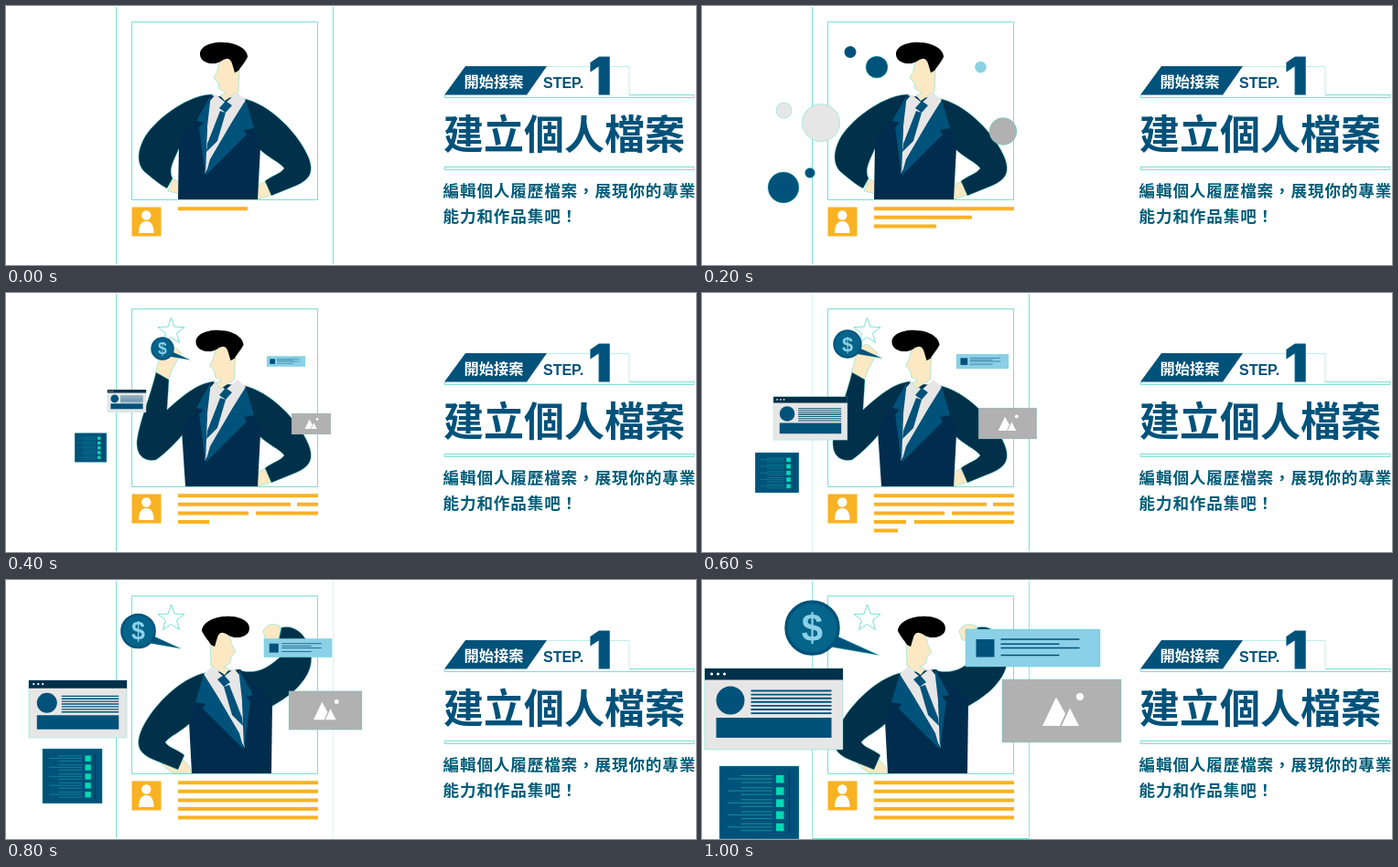
An HTML page for the animation above (1500 ms loop, 754 by 284 pixels).

```html
<!DOCTYPE html>
<html lang="zh-Hant">
<head>
<meta charset="utf-8">
<title>建立個人檔案</title>
<style>
  html, body { margin: 0; width: 100%; height: 100%; overflow: hidden; background: #fff; }
  svg { display: block; width: 100%; height: 100%; }
  text { font-family: "Noto Sans CJK TC", "Noto Sans CJK", sans-serif; font-weight: 700; fill: #00527a; }
  .latin { font-family: "Liberation Sans", Arial, sans-serif; }
  .body { font-size: 17.6px; letter-spacing: .85px; fill: #005c78; }
  .thin { fill: none; stroke: #58d8c6; stroke-width: .8; }
  .edge { stroke: #35dcc0; stroke-width: .4; }
  .navy { fill: #00304a; }
  .blue { fill: #00527a; }
  .skin { fill: #fde8c4; }
  .sky { fill: #8cd0e7; }
  .light { fill: #e6e6e6; }
  .gray { fill: #b1b1b1; }
  .white { fill: #fff; }
  .yellow { fill: #f9b223; }
</style>
</head>
<body>
<svg viewBox="0 0 754 284" preserveAspectRatio="none">
  <g class="thin">
    <path id="leftLine" d="M120.5 1V283"/>
    <path id="rightLine" d="M357.5 1V283"/>
    <path id="bottomLine" d="M120.5 283.5H357.5"/>
    <path d="M137.5 17.5H340.5V212.5H137.5Z"/>
    <path d="M681 97.5H752V100.5H479.5V97.5M479.5 176.5H752V179.5H479.5Z"/>
    <path d="M590 66.5H681V97" opacity=".5"/>
  </g>

  <path class="blue" d="M502 66H591L569 97.5H479Z"/>
  <text x="500.5" y="89" font-size="16.3" style="fill:#fff">開始接案</text>
  <text class="latin" x="587" y="90" font-size="16">STEP.</text>
  <text x="636.5" y="96.5" font-size="56" stroke="#00527a" style="font-family:Inter,sans-serif;font-weight:900">1</text>
  <text x="478" y="156.5" font-size="44">建立個人檔案</text>
  <text class="body" x="477.500" y="208.5">編輯個人履歷檔案，展現你的專業</text>
  <text class="body" x="477.500" y="237">能力和作品集吧！</text>

  <path class="yellow" d="M137.5 220.5H169.5V252.5H137.5Z"/>
  <circle class="white" cx="153.3" cy="229.5" r="5.2"/>
  <path class="white" d="M145 249C145 240 148 236 153.3 236S161.5 240 161.5 249Z"/>
  <path id="rows" stroke="#f9b223" stroke-width="4"/>

  <g id="man">
    <path id="leftHand" class="skin edge"/>
    <path id="leftArm" class="navy edge"/>
    <path id="rightHand" class="skin edge"/>
    <path class="navy edge" d="M257 101C289 106 322 143 331 167C337 183 331 191 317 197L290 208 283 192C290 186 300 184 304 178C300 172 286 166 277 157Z"/>
    <path id="torso" fill="#002d4d"/>
    <path class="light" d="M229 97L221 106 217 184 250 132 262 103 253 95 240 106Z"/>
    <g id="head">
      <path class="skin edge" d="M234 58L248 56 250 73 255 69 254 94 239 104 234 98 240 95 233 91 232 84 227 79 231 71Z"/>
      <path d="M212 53C212 44 225 39 238 40C251 40 264 47 264 56C261 62 257 66 254 71L250 73 247 63C245 56 240 57 236 60C228 66 212 63 212 53Z"/>
    </g>
    <path class="blue" d="M240 104L247 109 240 117 233 112ZM234 115L240 117 231 148 219 160 220 151Z"/>
    <path class="blue" d="M224 97L208 126 216 128 211 133 218 186 220 132ZM262 103L271 134 260 136 263 141 218 186 223 168 247 127Z"/>
  </g>

  <path id="star" class="thin" d="M180.5 27L184 37 195 37.5 186.5 44 189.5 54.5 180.5 48.5 171.5 54.5 174.5 44 166 37.5 177 37Z"/>

  <!-- Cards are drawn around their own centre at full size. -->
  <g id="windowCard">
    <path class="light edge" d="M-75.5-44.5H75.5V44.5H-75.5Z"/>
    <path class="navy" d="M-75.5-44.5H75.5V-32H-75.5Z"/>
    <path d="M-68-38.5h.1m6.9 0h.1m6.9 0h.1" stroke="#fff" stroke-width="3" stroke-linecap="round"/>
    <circle class="blue" cx="-47.5" cy="-9.5" r="15.5"/>
    <path id="windowText" stroke="#00527a" stroke-width="1.9"/>
    <path class="blue" d="M-63 9.5H63V31.5H-63Z"/>
  </g>
  <g id="listCard">
    <path class="blue edge" d="M-43.5-40H43.5V40H-43.5Z"/>
    <g id="listItems"></g>
    <path d="M33-33V33" stroke="#00304a" stroke-width="1"/>
  </g>
  <g id="imageCard">
    <path class="gray edge" d="M-65-34.5H65V34.5H-65Z"/>
    <path class="white" d="M-21 16.5L-6-15 4 3-2 16.5ZM0 16.5L9-3 19 16.5Z"/>
    <circle class="white" cx="20" cy="-15.5" r="4"/>
  </g>
  <g id="textCard">
    <path class="sky edge" d="M-73.5-20.5H73.5V20.5H-73.5Z"/>
    <path class="blue" d="M-62-9.5H-42V10H-62Z"/>
    <path d="M-35-9.5H51M-35-4.2H29M-35 0H51M-35 8H29" stroke="#00527a" stroke-width="1.5"/>
  </g>
  <g id="bubble">
    <path class="blue edge" d="M27 9L73 30 21 21Z"/>
    <circle r="28.5" fill="#04648a" stroke="#00527a" stroke-width="3.5"/>
    <text class="latin" y="14.5" font-size="42" text-anchor="middle" style="fill:#8cd0e7">$</text>
  </g>

  <g id="dots">
    <circle class="blue" cx="162" cy="50.5" r="6.5"/>
    <circle class="blue edge" cx="191" cy="67" r="12"/>
    <circle class="sky edge" cx="304.5" cy="67" r="6"/>
    <circle class="light edge" cx="89.5" cy="114.5" r="8.5"/>
    <circle class="light edge" cx="130" cy="128" r="20.5"/>
    <circle class="gray edge" cx="329" cy="137.5" r="15"/>
    <circle class="blue edge" cx="89" cy="199" r="17"/>
    <circle class="blue edge" cx="118" cy="183" r="5.5"/>
  </g>
</svg>
<script>
const LOOP = 1500;
const el = id => document.getElementById(id);
const show = (id, on) => el(id).setAttribute('visibility', on ? 'visible' : 'hidden');
const setPath = (id, d) => el(id).setAttribute('d', d);

const hipHand = 'M275 197L284 192 291 207 275 212Z';
const poses = {
  hips: {
    leftHand: 'M177 203L182 189 189 193 190 206Z',
    leftArm: 'M226 97C203 96 167 120 152 143C141 162 144 177 154 184C162 191 170 197 176 200L182 189C177 178 184 169 190 154Z',
    rightHand: hipHand,
    torso: 'M222 98L260 102 278 155 275 212H188L189 150Z',
    head: 0
  },
  raised: {
    leftHand: 'M163 89L168 70C171 60 176 55 182 57L192 66 187 74 181 85 177 97Z',
    leftArm: 'M228 97C211 98 196 110 176 128L178 95 164 87C157 115 146 140 143 162C142 181 154 185 164 183C175 175 185 165 195 153Z',
    rightHand: hipHand,
    torso: 'M222 98L260 102 278 155 275 212H196L192 150Z',
    head: -4.5
  },
  high: {
    leftHand: 'M178 51C186 46 194 49 197 56L194 66H180Z',
    leftArm: 'M226 98C205 105 193 97 178 84L180 66 177 52C163 49 153 58 148 70C141 85 144 100 156 114C164 124 176 132 190 140Z',
    rightHand: 'M275 212C276 205 282 198 289 194L302 190 308 202 296 212Z',
    torso: 'M222 98L260 102 278 155 275 212H188L187 135Z',
    head: 0
  }
};

// Card centre x, centre y, scale.
const cardSizes = {
  small:  { windowCard: [132, 118.5, .28], listCard: [92.5, 169.5, .4], imageCard: [333.5, 143.5, .33], textCard: [306, 75, .285], bubble: [171, 61, .42] },
  medium: { windowCard: [118.5, 137.5, .535], listCard: [82, 197, .55], imageCard: [334, 143, .49], textCard: [306.5, 75, .388], bubble: [159, 56, .52] },
  large:  { windowCard: [78.5, 141.5, .71], listCard: [72.5, 215, .75], imageCard: [349, 143, .615], textCard: [319, 74.5, .505], bubble: [144.5, 56, .64] },
  full:   { windowCard: [78.5, 141.5, 1], listCard: [62.5, 244, 1], imageCard: [393, 143.5, 1], textCard: [361.5, 74.5, 1], bubble: [120.5, 52.5, 1] }
};
const blend = (a, b) => Object.fromEntries(Object.keys(a).map(
  id => [id, a[id].map((v, i) => (v + b[id][i]) / 2)]));
const shrink = (cards, k) => Object.fromEntries(Object.entries(cards).map(
  ([id, [x, y, s]]) => [id, [x, y, s * k]]));

// Each row of body text is a list of from-to spans.
const rowPath = rows => rows.map((spans, i) =>
  spans.map(([from, to]) => `M${from} ${222.3 + 9.55 * i}H${to}`).join('')).join('');
const line = [[188, 341]];
const row2 = [[188, 311], [318, 341]];
const row3 = [[188, 265], [273, 341]];

const steps = [
  { at: 0, pose: 'hips', rows: [[[188, 264]]], lines: [1, 1] },
  { at: 200, pose: 'hips', rows: [line, [[188, 295]], [[188, 256]]], lines: [1, 0], dots: true },
  { at: 330, pose: 'raised', rows: [line, row2, [[188, 265]]], lines: [1, 0], cards: shrink(cardSizes.small, .8) },
  { at: 400, pose: 'raised', rows: [line, row2, row3, [[188, 222]]], lines: [1, 0], cards: cardSizes.small },
  { at: 600, pose: 'raised', rows: [line, row2, row3, [[188, 223], [232, 341]], [[188, 214]]], lines: [.3, 1], cards: cardSizes.medium },
  { at: 670, pose: 'high', rows: Array(5).fill(line), lines: [1, .3], cards: blend(cardSizes.medium, cardSizes.large) },
  { at: 800, pose: 'high', rows: Array(5).fill(line), lines: [1, .3], cards: cardSizes.large },
  { at: 1000, pose: 'high', rows: Array(5).fill(line), lines: [.8, .8], cards: cardSizes.full, bottom: true }
];

setPath('windowText', Array.from({ length: 7 }, (_, i) => `M-25 ${-20 + i * 4.1}H63`).join(''));
el('listItems').innerHTML = [0, 1, 2, 3, 4].map(i => {
  const y = -30 + i * 13.2;
  return `<path d="M18.5 ${y}h8.500v8.500h-8.500Z" fill="#00d9b4"/>
    <path d="M-20 ${y + .5}H14M-34 ${y + 4}H14M-20 ${y + 8}H14" stroke="#168f9c" stroke-width="1"/>`;
}).join('');

function draw(step) {
  const pose = poses[step.pose];
  for (const part of ['leftHand', 'leftArm', 'rightHand', 'torso']) setPath(part, pose[part]);
  el('head').setAttribute('transform', `translate(${pose.head} ${pose.head ? 1 : 0})`);
  el('man').setAttribute('transform', step.pose === 'high' ? 'translate(478) scale(-1 1)' : '');
  setPath('rows', rowPath(step.rows));
  el('leftLine').setAttribute('opacity', step.lines[0]);
  el('rightLine').setAttribute('opacity', step.lines[1]);
  show('bottomLine', step.bottom);
  show('dots', step.dots);
  show('star', step.cards);
  for (const id of Object.keys(cardSizes.full)) {
    show(id, step.cards);
    if (!step.cards) continue;
    const [x, y, scale] = step.cards[id];
    el(id).setAttribute('transform', `translate(${x} ${y}) scale(${scale})`);
  }
}

const start = performance.now();
let shown;
function tick() {
  const time = (performance.now() - start) % LOOP;
  const step = steps.findLast(s => s.at <= time);
  if (step !== shown) draw(shown = step);
  requestAnimationFrame(tick);
}
tick();
</script>
</body>
</html>
```
